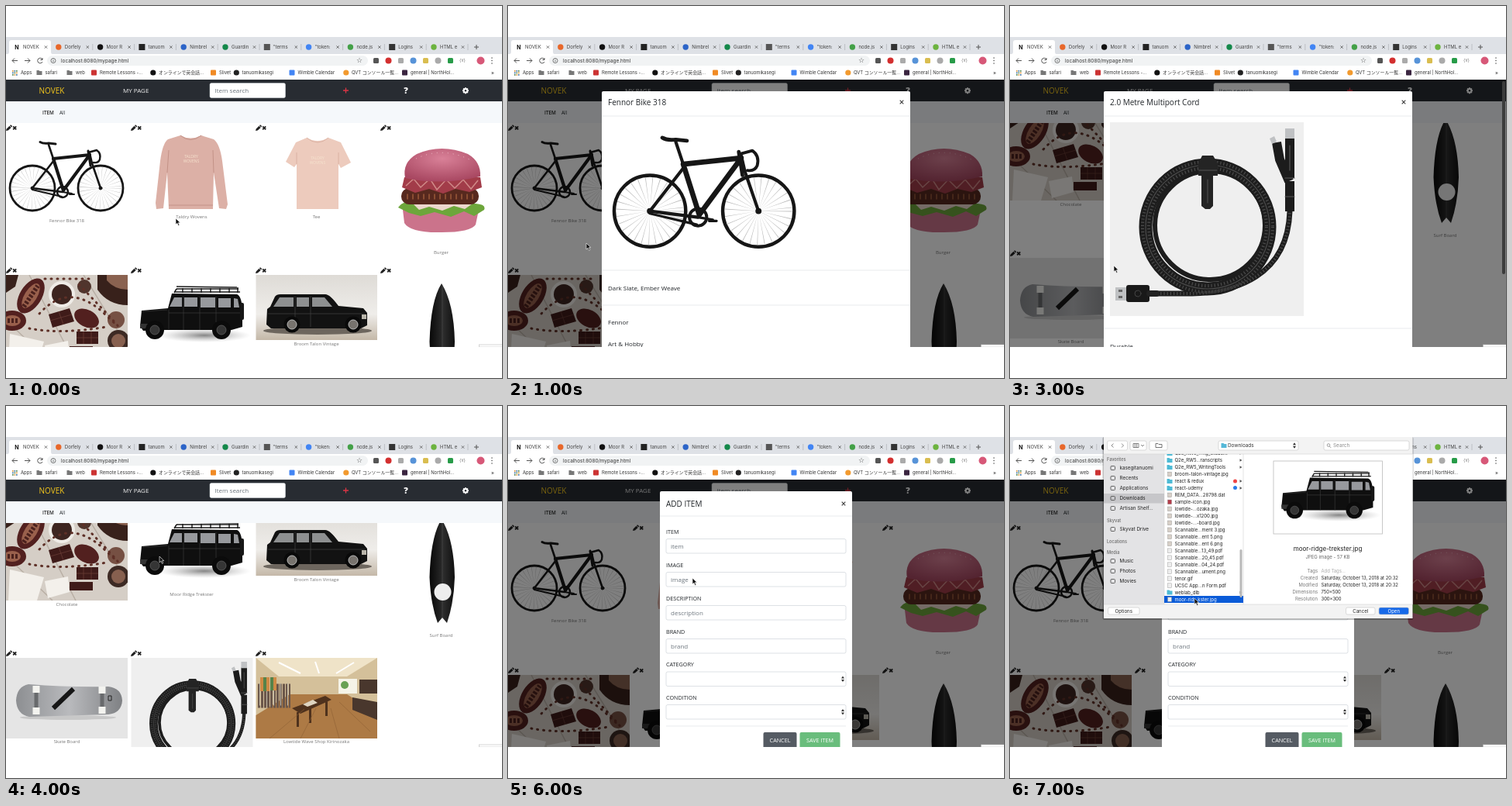
These frames come from a looping animation (640 px wide and 480 px high, 8 s). An HTML page:

```html
<!DOCTYPE html>
<html lang="en">
<head>
<meta charset="utf-8">
<title>Item page demo</title>
<style>
html, body { margin: 0; width: 100%; height: 100%; overflow: hidden; background: #fff; }
svg { display: block; width: 640px; height: 480px; }
text { font-family: "Open Sans", sans-serif; white-space: pre; }
.ui { font-family: Inter, "Noto Sans CJK JP", sans-serif; }
</style>
</head>
<body>
<svg viewBox="0 0 640 480">
<defs>
  <clipPath id="view"><path d="M0 95H640V440H0Z"/></clipPath>
  <clipPath id="items"><path d="M0 151H640V440H0Z"/></clipPath>
  <clipPath id="cocoaBox"><path d="M0 347H157V463H0Z"/></clipPath>
  <clipPath id="listBox"><path d="M199 62H301V255H199Z"/></clipPath>
  <radialGradient id="bun" cx=".5" cy=".3" r=".7"><stop stop-color="#d98198"/><stop offset="1" stop-color="#a94862"/></radialGradient>
  <linearGradient id="studio" x2="0" y2="1"><stop stop-color="#dedbd6"/><stop offset=".6" stop-color="#efedea"/><stop offset="1" stop-color="#c4b8a8"/></linearGradient>
  <linearGradient id="deck"><stop stop-color="#8d8f92"/><stop offset=".5" stop-color="#b9babd"/><stop offset="1" stop-color="#7f8184"/></linearGradient>
  <linearGradient id="board"><stop stop-color="#080808"/><stop offset=".55" stop-color="#2c2c2c"/><stop offset="1" stop-color="#101010"/></linearGradient>
  <radialGradient id="shade"><stop stop-color="#666" stop-opacity=".8"/><stop offset="1" stop-color="#aaa" stop-opacity="0"/></radialGradient>

  <g id="bike" fill="none" stroke="#161616" stroke-linecap="round" stroke-linejoin="round">
    <g id="wheel"><circle cx="34" cy="235" r="29" stroke-width="2.8"/>
      <circle cx="34" cy="235" r="15" stroke="#bbb" stroke-width="25" stroke-dasharray=".3 3.1" stroke-linecap="butt"/><circle cx="34" cy="235" r="2" fill="#161616"/></g>
    <use href="#wheel" x="88"/>
    <path stroke-width="4.2" d="M61 197 108 192 74 238Z"/>
    <path stroke-width="2.6" d="M55 179 61 197M62 199 34 235 73 240M108 190 111 203 122 235"/>
    <path stroke-width="3" d="M44 175.5Q48 178 55 177L64 178M106 187 109 206"/>
    <path stroke-width="2.4" d="M106 189 117 186Q123 190 121 198 119 203 113 202"/>
    <circle cx="73" cy="240" r="7" stroke-width="2.5"/><path stroke-width="2" d="M73 240 85 242M82 243H88M34 237 72 246"/>
  </g>

  <g id="jeep">
    <ellipse cx="256" cy="425" rx="60" ry="9" fill="url(#shade)"/>
    <path d="M214 371 298 372Q304 374 305 392V414L291 418H205L177 419 173 413 175 393 209 390Z" fill="#0f0f0f"/>
    <path d="M217 376 227 376V388H211ZM230 376H247V388H230ZM251 376H270V389H251ZM274 377H290V389H274ZM294 377 299 378 301 389H294Z" fill="#97999d"/>
    <path d="M220 365H300M218 369H302M220 365 217 370M228 364V370M240 364V370M252 364V370M264 364V370M276 364V370M288 364V370M299 363V370M220 362 298 363" stroke="#1b1b1b" stroke-width="1.5"/>
    <path d="M176 394 208 392M210 392V417M229 375V418M250 375V418M271 375V408M210 396H303" stroke="#3c3c3c" stroke-width=".7"/>
    <path d="M173 410H184V416H173Z" fill="#333"/><rect x="302" y="383" width="5" height="22" rx="2" fill="#171717"/>
    <g id="tyre"><circle cx="192" cy="418" r="12" fill="#0b0b0b"/><circle cx="192" cy="418" r="6" fill="#353535" stroke="#666" stroke-width=".7"/></g>
    <use href="#tyre" x="86"/>
  </g>

  <g id="cable" fill="none" stroke-linecap="round">
    <path fill="#efefef" d="M129 150H379V400H129Z"/>
    <g stroke="#1d1d1d"><circle cx="255" cy="285" r="80" stroke-width="17"/><ellipse cx="258" cy="283" rx="71" ry="70" stroke-width="6"/>
      <path stroke-width="7" d="M190 371 235 371C290 369 358 350 361 265"/></g>
    <g stroke="#4b4b4b" stroke-width="1.2" stroke-linecap="butt"><circle cx="255" cy="285" r="84" stroke-width="4" stroke-dasharray="1.2 3"/><circle cx="255" cy="285" r="76" stroke-width="4" stroke-dasharray="1.2 3"/>
      <circle cx="255" cy="285" r="80"/><path stroke-width="4" stroke-dasharray="1.2 3" d="M190 371 235 371C290 369 358 350 361 265"/></g>
    <path fill="#242424" d="M248 193H262L268 203V219H262V258L258 262H252L247 258V219H243V203Z"/><path stroke="#555" d="M244 212H267M255 224V254"/>
    <path stroke="#1c1c1c" stroke-width="12" stroke-linecap="butt" d="M361 170V222M344 176 348 198 360 226M361 226V265"/>
    <path stroke="#565656" stroke-width="1.2" d="M355 222H367M355 246H367M361 180V212"/>
    <path fill="#bfc1c3" d="M355 158H367V171H355ZM335 171 341 168 344 175 338 178ZM136 363H152V380H136Z"/>
    <path fill="#666" d="M140 366H145V369H140ZM140 374H145V377H140Z"/>
    <rect x="150" y="360" width="30" height="22" rx="3" fill="#191919"/><path stroke="#222" stroke-width="8" d="M180 371H189"/><circle cx="165" cy="371" r="4" stroke="#444"/>
  </g>

  <g id="cocoa" clip-path="url(#cocoaBox)">
    <path fill="#d5cec6" d="M0 347H157V463H0Z"/><path stroke="#b9afa5" stroke-width="1.5" d="M30 347 90 463M100 347 157 440M0 405 60 463"/>
    <path fill="#38211b" d="M0 347H16L12 362 0 370ZM118 347H157V386Q132 386 118 366Z"/><path fill="#8a6250" d="M130 347H157V366Q140 366 130 354Z"/>
    <g fill="#52201f"><ellipse cx="32" cy="374" rx="14" ry="25" transform="rotate(32 32 374)"/><ellipse cx="8" cy="406" rx="18" ry="13"/><ellipse cx="104" cy="403" rx="17" ry="11" transform="rotate(28 104 403)"/></g>
    <g fill="#99604c"><ellipse cx="32" cy="374" rx="8" ry="18" transform="rotate(32 32 374)"/><ellipse cx="8" cy="406" rx="11" ry="7"/></g>
    <path d="M23 388 41 361M2 406H15" stroke="#4b211d" stroke-width="6" stroke-dasharray="3 2"/>
    <circle cx="72" cy="372" r="17" fill="#efece7"/><circle cx="72" cy="372" r="13" fill="#3d2520"/><circle cx="101" cy="362" r="9" fill="#50352d"/>
    <path fill="#3f1b19" d="M55 398 82 390 88 407 60 415ZM91 420H119V436H91ZM82 439H112V450H82Z"/><path stroke="#6e4038" stroke-width=".7" d="M57 406 85 398M68 394 74 411M91 428H119M100 420V436M110 420V436"/>
    <path fill="#f3f0eb" d="M5 423 49 433 40 463H3ZM50 438 80 432 82 452 54 460Z"/>
    <circle cx="142" cy="405" r="11" fill="#765043"/><circle cx="145" cy="432" r="14" fill="#3d2a24"/><circle cx="145" cy="432" r="9" fill="#87604f"/>
    <path d="M43 397Q82 354 128 398T90 355M50 352H110M30 416Q70 424 130 414" fill="none" stroke="#5e3027" stroke-width="3" stroke-linecap="round" stroke-dasharray="1 7"/>
  </g>

  <g id="cruiser">
    <path fill="url(#studio)" d="M322.5 347H479V431H322.5Z"/><ellipse cx="402" cy="419" rx="70" ry="5" fill="#6d665e"/>
    <path fill="#121212" d="M347 375Q349 372 354 372H412Q418 372 429 387L461 390 466 396V412L458 416H342L336 411 337 391 341 388Z"/>
    <path fill="#8e9091" d="M353 376H371V388H345ZM375 376H391V388H375ZM395 376H411L421 388H395Z"/>
    <path d="M338 397H463M373 375V414M393 375V414" stroke="#444" stroke-width=".7"/><path fill="#b9b5aa" d="M459 398H465V404H459Z"/>
    <g id="rim"><circle cx="369" cy="411" r="10.5" fill="#090909"/><circle cx="369" cy="411" r="6" fill="#77736e" stroke="#bbb"/></g><use href="#rim" x="79"/>
  </g>

  <g id="burger">
    <path fill="#cb738b" d="M512 263H610L606 282Q600 292 562 292 522 293 514 280Z"/>
    <path fill="#6da63b" d="M506 260Q514 249 526 255H606Q620 256 617 263L604 271 591 265 574 272 553 266 535 271 520 267Z"/>
    <path fill="#ecd7cd" d="M525 255H602L592 262 578 258 563 264 546 259 533 263Z"/>
    <rect x="510" y="235" width="100" height="21" rx="10" fill="#57291e"/><path d="M517 246H604" stroke="#8a4d32" stroke-width="7" stroke-dasharray="2 5"/>
    <path fill="#a23c49" d="M514 221H612L614 234 598 240 580 236 564 242 546 236 528 241 511 234Z"/>
    <path d="M516 232 526 223 535 234 547 223 556 237 568 224 579 235 590 224 600 236 609 225" fill="none" stroke="#d08a88" stroke-width="1.5"/>
    <path fill="url(#bun)" d="M515 222Q511 202 530 191 562 177 596 191 613 201 612 220 562 232 515 222Z"/>
    <path d="M529 197Q562 181 598 198" fill="none" stroke="#f1bdc8" stroke-dasharray="1 6"/>
  </g>

  <g id="surf"><path fill="url(#board)" d="M562 358Q548 380 546.5 433 548 468 557 492L563 485 569 492Q578 466 579 433 578 384 562 358Z"/><path stroke="#555" stroke-width=".6" d="M563 360V485"/><circle cx="563.5" cy="452" r="11" fill="#eee"/></g>

  <g id="skate">
    <path fill="#e5e5e5" d="M0 325H157V429H0Z"/><ellipse cx="80" cy="402" rx="62" ry="3" fill="#c8c8c8"/>
    <path fill="url(#deck)" d="M29 359Q82 363 132 362 149 364 150 380 149 396 132 398L30 401Q14 398 13 380 14 362 29 359Z"/>
    <path stroke="#161616" stroke-width="6" d="M61 390 87 365"/>
    <path stroke="#686a6c" stroke-width="5" d="M39 366V394M124 366V394"/><path stroke="#f3f3ef" stroke-width="9" d="M39 361V370M39 389V398M124 362V371M124 388V397"/>
    <path stroke="#222" d="M132 374H136V380H132Z" fill="none"/>
  </g>

  <g id="shop">
    <path fill="#d4c09a" d="M322.5 325H479V429H322.5Z"/><path fill="#efe3c8" d="M322.5 325H479L440 349H352Z"/><path fill="#ad7a45" d="M322.5 399 366 372H440L479 397V429H322.5Z"/>
    <path stroke="#fff" stroke-width="2" d="M352 331 380 345M399 330 404 345M449 331 426 345"/>
    <path d="M325 374H367" stroke="#6b574b" stroke-width="31" stroke-dasharray="3 1"/><path d="M327 372H365" stroke="#c0b9a8" stroke-width="29" stroke-dasharray="1 8"/>
    <path d="M330 350V368M338 350V368M347 350V367" stroke="#cf8a45" stroke-width="4"/><path d="M334 350V368M343 350V367" stroke="#56834a" stroke-width="4"/>
    <path fill="#f5f3e7" d="M429 352H453V371H429Z"/><circle cx="437" cy="360" r="5" fill="#68a052"/><path fill="#49372d" d="M456 353H479V371H456ZM447 376 479 382V405L447 392Z"/>
    <path fill="#4f321d" d="M369 390 412 374 420 379 380 397ZM391 381H394V409H391ZM412 379H415V400H412ZM375 395H378V414H375Z"/><path fill="#ded4c0" d="M383 385 396 379 402 383 389 388Z"/>
    <path stroke="#8e6035" stroke-width=".6" d="M340 429 385 391M380 429 400 390M430 429 419 390M470 420 430 382"/>
  </g>
</defs>
<g id="stage"></g>
</svg>

<script>
const stage = document.getElementById('stage');

// Text is placed by its vertical centre.
const text = (x, y, s, size, fill = '#212529', more = '') =>
  `<text x="${x}" y="${y + size * .36}" font-size="${size}" fill="${fill}" ${more}>${s}</text>`;
const ui = (x, y, s, size = 5.9, fill = '#333', more = '') => text(x, y, s, size, fill, 'class="ui" ' + more);
const mid = 'text-anchor="middle"', end = 'text-anchor="end"';
const rect = (x, y, w, h, fill, more = '') => `<rect x="${x}" y="${y}" width="${w}" height="${h}" fill="${fill}" ${more}/>`;
const dot = (x, y, r, fill) => `<circle cx="${x}" cy="${y}" r="${r}" fill="${fill}"/>`;
const line = (d, stroke = '#555', w = 1) => `<path d="${d}" fill="none" stroke="${stroke}" stroke-width="${w}"/>`;
const cross = (x, y, r, stroke, w) => line(`M${x - r} ${y - r}l${2 * r} ${2 * r}m0 ${-2 * r}l${-2 * r} ${2 * r}`, stroke, w);
const folder = (x, y, fill) => `<path d="M${x - 3.5} ${y - 3}h3l1 1h3v5h-7z" fill="${fill}"/>`;

function browser() {
  const tabs = [['NOVEK', ''], ['Dorfely', '#e8672a'], ['Moor R', '#111'], ['tanuom', '#222'], ['Nimbrel', '#2c64c8'], ['Guardin', '#14884a'],
    ['"terms', '#555'], ['"token:', '#4285f4'], ['node.js', '#43a047'], ['Logins', '#333'], ['HTML e', '#6cb33f']];
  const marks = [[19, 'Apps'], [50.5, 'safari'], [90, 'web'], [121, 'Remote Lessons -…', '#c33'], [197, 'オンラインで英会話…', '#111'], [275, 'Slivet', '#f08a24'],
    [304.5, 'tanuomikasegi', '#222'], [376.5, 'Wimble Calendar', '#4285f4'], [446, 'QVT コンソール一覧…', '#f29a2e'], [522, 'general | NorthHol…', '#3a2540']];
  const extras = ['#555', '#d32f2f', '#aaa', '#5793d8', '#d9bd50', '#aaa', '#279b48'];
  return rect(0, 40, 640, 22, '#dee1e6') + `<path d="M2 62Q4 62 4 59V47Q4 44 7 44H55Q58 44 58 47V59Q58 62 60 62Z" fill="#fff"/>` +
    tabs.map(([s, c], i) => {
      const x = 14 + i * 53.8;
      return (c ? (i % 3 ? dot(x, 53, 3.7, c) : rect(x - 4, 49, 8, 8, c)) : ui(x, 53, 'N', 7, '#111', mid + ' font-weight="700"')) +
        ui(x + 8, 53, s, 6, '#444') + cross(x + 37.5, 53, 1.7, '#555', .8) + (i ? line(`M${x + 44} 49v8`, '#9b9ea3', .5) : '');
    }).join('') + line('M604 53h6m-3-3v6') +
    rect(0, 62, 640, 33, '#fff') + rect(53, 64, 414, 13, '#f1f3f4', 'rx="6.5"') +
    line('M15 70.5H8m3-3-3 3 3 3M24 70.5h7m-3-3 3 3-3 3M47 69a3.3 3.3 0 1 0 0 3m0-5v2.5h-2.5') +
    `<circle cx="61" cy="70.5" r="3" fill="none" stroke="#555" stroke-width=".8"/>` + line('M61 70v2m0-3.3v.7', '#555', .8) +
    ui(71, 70.5, 'localhost:8080/mypage.html', 6.45) + text(456, 70, '☆', 9, '#555', mid) +
    extras.map((c, i) => i % 2 ? dot(477.5 + i * 16, 70.5, 4, c) : rect(474 + i * 16, 67, 7, 7, c, 'rx="1.5"')).join('') +
    ui(589, 70.5, '{v}', 5.5, '#777', mid) + dot(612.5, 70.5, 5, '#d75878') +
    [67, 70.5, 74].map(y => dot(627, y, .8, '#555')).join('') +
    [0, 1, 2].map(i => [0, 1, 2].map(j => rect(8 + i * 2.5, 83 + j * 2.5, 1.7, 1.7, ['#d94', '#47a', '#585'][(i + j) % 3])).join('')).join('') +
    folder(43, 86, '#777') + folder(82, 86, '#777') +
    marks.map(([x, s, c], i) => ui(x, 86, s) + (c ? (i % 2 ? rect(x - 11, 82.5, 7, 7, c, 'rx="1"') : dot(x - 7.2, 86, 3.6, c)) : '')).join('') +
    ui(626, 86, '»', 6.5);
}

function header() {
  const teeth = [0, 45, 90, 135].map(a => `<path d="M593 105.2v8" stroke="#fff" stroke-width="2" transform="rotate(${a} 593 109.2)"/>`).join('');
  return rect(0, 95, 640, 28, '#282c32') + rect(0, 123, 640, 28, '#f5f8fb') +
    text(42.5, 109, 'NOVEK', 10, '#f5c81c') + text(151, 109, 'MY PAGE', 8, '#f0f0f0') +
    rect(263, 99.5, 97.5, 19, '#fff', 'rx="2" stroke="#ced4da" stroke-width=".5"') + text(269.5, 109, 'Item search', 8, '#6c757d') +
    line('M435 109h7m-3.5-3.5v7', '#dc3545', 1.3) + text(516, 109, '?', 11, '#fff', mid + ' font-weight="800"') +
    teeth + dot(593, 109.2, 3.1, '#fff') + dot(593, 109.2, 1.2, '#282c32') +
    text(47, 137.5, 'ITEM', 6.3, '#222', 'font-weight="600"') + text(69, 137.5, 'All', 6.3);
}

function items(scroll) {
  const caption = (col, y, s) => text(78.5 + col * 161, y, s, 6, '#777', mid);
  const tools = (col, y) => `<g transform="translate(${col * 161} ${y})"><path d="M0 4 .7 1.5 4.5-2.3 6.7-.1 2.8 3.5ZM5-2.8 6-3.7Q8-3 8-1.5L7.2-.6Z" fill="#222"/>${cross(11.2, .3, 2, '#222', 1.9)}</g>`;
  const print = (x, y) => ['TALDRY', 'WOVENS'].map((s, i) => text(x, y + i * 6, s, 5, '#f6e3cf', mid)).join('');
  const tops = `<path fill="#dcb0a6" d="M225 167Q238 174 252 167L268 172Q276 178 279 200L286 256 284 262 275 261 268 215 267 262H210L208 215 203 261 194 262 193 254 199 200Q202 177 209 172Z"/>` +
    line('M225 167Q238 178 252 167M210 257H267M208 215 210 186M268 215 267 186', '#c39287') + print(239, 194) +
    `<path fill="#edcbbd" d="M388 170Q402 178 416 170L432 176 445 202 432 209 429 204V262H375V204L372 208 361 201 374 176Z"/>` +
    line('M388 170Q402 182 416 170M375 204V189M429 204V189', '#d6ab9c', .8) + print(402, 196);
  const lower = ['skate', 'shop'].map(id => `<use href="#${id}"/>`).join('') +
    `<use href="#cable" transform="translate(161.5 325) scale(.628) translate(-129 -150)"/>` +
    [0, 1, 2].map(i => tools(i, 319)).join('') + caption(0, 433, 'Skate Board') + caption(2, 433, 'Lowtide Wave Shop Kirinozaka');
  return `<g clip-path="url(#items)"><g transform="translate(0 ${-scroll})">` + tops +
    ['bike', 'burger', 'cocoa', 'jeep', 'cruiser', 'surf'].map(id => `<use href="#${id}"/>`).join('') +
    [157, 341].map(y => [0, 1, 2, 3].map(i => tools(i, y)).join('')).join('') +
    caption(0, 277, 'Fennor Bike 318') + caption(1, 271.5, 'Taldry Wovens') + caption(2, 271.5, 'Tee') + caption(3, 317.5, 'Burger') +
    caption(0, 468, 'Chocolate') + caption(1, 454.5, 'Moor Ridge Trekster') + caption(2, 435.5, 'Broom Talon Vintage') + caption(3, 507.5, 'Surf Board') +
    `<g transform="translate(0 212)">${lower}</g></g></g>`;
}

const dim = rect(0, 95, 640, 345, '#000', 'opacity=".5"');
const rule = (y, x0 = 121, x1 = 519) => line(`M${x0} ${y}H${x1}`, '#dee2e6', .7);

function detail({ title, art, x, y, scale = 1.592, h, notes }, dy = 0, alpha = 1) {
  const b = 150 + h, rows = [39, 83, 111, 139];
  return `<g clip-path="url(#view)"><g opacity="${alpha}" transform="translate(0 ${dy})">` + rect(121, 110, 398, b + 43, '#fff', 'rx="2"') +
    text(129, 124, title, 10) + cross(508, 124, 2.3, '#444', 1.2) + rule(142) +
    `<use href="#${art}" transform="translate(129 150) scale(${scale}) translate(${-x} ${-y})"/>` + rule(b + 16) + rule(b + 61) +
    notes.map((s, i) => text(129, b + rows[i], s, 8)).join('') + '</g></g>';
}
const bike = { title: 'Fennor Bike 318', art: 'bike', x: 0, y: 163, h: 175, notes: ['Dark Slate, Ember Weave', 'Fennor', 'Art &amp; Hobby', 'Good'] };
const jeep = { title: 'Moor Ridge Trekster', art: 'jeep', x: 161.5, y: 347, h: 166, notes: ['Cool', 'Moor Talon', 'Art &amp; Hobby', 'New'] };
const cord = { title: '2.0 Metre Multiport Cord', art: 'cable', x: 129, y: 150, scale: 1, h: 250, notes: ['Durable'] };

const arrows = (x, y) => `<path d="M${x - 2} ${y - .8}l2-3 2 3zm0 1.6l2 3 2-3z" fill="#333"/>`;

function form() {
  const field = (y, label, hint) => text(204, y, label, 7.2) + rect(204, y + 9.5, 232, 18.5, '#fff', 'rx="2" stroke="#ced4da" stroke-width=".7"') +
    (hint ? text(210, y + 18.8, hint, 8, '#6c757d') : arrows(432, y + 18.8));
  const button = (x, w, s, fill) => rect(x, 421, w, 22, fill, 'rx="2"') + text(x + w / 2, 431, s, 7.2, '#fff', mid);
  return '<g clip-path="url(#view)">' + rect(196, 110, 248, 350, '#fff', 'rx="2"') + rule(142, 196, 444) + text(204, 126, 'ADD ITEM', 10) + cross(433, 126, 2.3, '#444', 1.2) +
    field(162, 'ITEM', 'item') + field(205, 'IMAGE', 'image') + field(248, 'DESCRIPTION', 'description') +
    field(291, 'BRAND', 'brand') + field(333.5, 'CATEGORY') + field(376, 'CONDITION') + rule(413, 204, 436) +
    button(329.5, 43, 'CANCEL', '#555b63') + button(376.5, 52, 'SAVE ITEM', '#69bd7c') + '</g>';
}

function picker() {
  const side = [[69, 'Favorites', 1], [80, 'kasegitanuomi'], [93, 'Recents'], [106, 'Applications'], [119, 'Downloads'], [132, 'Artisan Shelf…'], [148, 'Skyvat', 1],
    [159, 'Skyvat Drive'], [175, 'Locations', 1], [189, 'Media', 1], [200, 'Music'], [213, 'Photos'], [226, 'Movies']];
  const files = ['Q2e_RW5_…ng_Student', 'Q2e_RW5…ranscripts', 'Q2e_RW5_WritingTools', 'broom-talon-vintage.jpg', 'react &amp; redux', 'react-udemy', 'REM_DATA…28798.dat',
    'sample-icon.jpg', 'lowtide-…ozaka.jpg', 'lowtide-…x1200.jpg', 'lowtide-…-board.jpg', 'Scannable…ment 3.jpg', 'Scannable…ent 5.png', 'Scannable…ent 6.png',
    'Scannable…13_49.pdf', 'Scannable…20_45.pdf', 'Scannable…04_24.pdf', 'Scannable…ument.png', 'tenor.gif', 'UCSC App…n Form.pdf', 'weblab_dlb', 'moor-rid…kster.jpg'];
  const folders = [0, 1, 2, 4, 5, 20];
  const facts = [['Tags', 'Add Tags…'], ['Created', 'Saturday, October 13, 2018 at 20:32'], ['Modified', 'Saturday, October 13, 2018 at 20:32'], ['Dimensions', '750×500'], ['Resolution', '300×300']];
  const button = (x, y, w, h, s = '', fill = '#fff', ink = '#222') => rect(x, y, w, h, fill, 'rx="2" stroke="#c4c4c4" stroke-width=".6"') + ui(x + w / 2, y + h / 2, s, 6.1, ink, mid);
  return rect(119.5, 40, 401, 236, '#000', 'opacity=".25" rx="2"') + rect(121, 40, 398.5, 234, '#f3f3f3') + rect(121, 62, 78, 194, '#e3e3e5') + rect(199, 62, 320.5, 194, '#fff') +
    line('M121 62H519.5M121 256H519.5M301 62V256M199 62V256', '#d0d0d0', .6) +
    button(125.5, 45, 26, 12) + line('M133.5 48.5l-2.5 2.5 2.5 2.5M144 48.5l2.5 2.5-2.5 2.5', '#888') +
    button(155, 45, 21, 12) + line('M159 48.5h7v5h-7zm2.3 0v5m2.3-5v5M169 50l2 2 2-2', '#555', .7) +
    button(180, 45, 23, 12) + line('M188 48.5h3l1 1h4v4h-8z', '#555', .8) +
    button(269, 45, 103, 12) + folder(276, 51, '#56b8d8') + ui(281, 51, 'Downloads', 6.4) + arrows(367, 51) +
    button(405, 45, 110, 12) + `<circle cx="411" cy="50.5" r="1.8" fill="none" stroke="#777" stroke-width=".7"/>` + line('M412.3 52l2 2', '#777', .7) + ui(417, 51, 'Search', 6.4, '#888') +
    rect(121, 113, 78, 12.5, '#c6c6c9') +
    side.map(([y, s, head]) => head ? ui(125, y, s, 5.5, '#777', 'font-weight="600"') : rect(130, y - 2.5, 5.5, 5, 'none', 'rx="1" stroke="#555" stroke-width=".9"') + ui(141.5, y, s, 6.3, '#222')).join('') +
    '<g clip-path="url(#listBox)">' + rect(199, 245, 102, 9, '#0a5bd8') +
    files.map((s, i) => {
      const y = 61 + i * 8.98, dir = folders.includes(i);
      return (dir ? folder(206, y, '#4dbad5') : rect(203.5, y - 2.8, 5, 5.6, i === 7 ? '#b43a48' : i > 13 ? '#eee' : '#d8d0c8', 'stroke="#888" stroke-width=".4"')) +
        ui(212.5, y, s, 6, i === 21 ? '#fff' : '#222') + (dir ? `<path d="M296.5 ${y - 1.8}l3 1.8-3 1.8z" fill="#555"/>` : '');
    }).join('') + dot(290.5, 97, 2.5, '#ef4444') + dot(290.5, 105.5, 2.5, '#287be8') + rect(296.5, 185, 3, 62, '#b9b9b9', 'rx="1.5"') + '</g>' +
    rect(340, 71, 140.5, 94, '#fff', 'stroke="#bbb" stroke-width=".8"') + `<use href="#jeep" transform="translate(340 71) scale(.895) translate(-161.5 -347)"/>` +
    ui(410, 184, 'moor-ridge-trekster.jpg', 8, '#222', mid) + ui(410, 194.5, 'JPEG image - 57 KB', 6, '#666', mid) +
    facts.map(([k, v], i) => ui(397, 213 + i * 9, k, 5.9, '#777', end) + ui(401.5, 213 + i * 9, v, 5.9, i ? '#222' : '#aaa')).join('') +
    button(126.5, 260, 40.5, 9, 'Options') + button(433.5, 260, 37.5, 9, 'Cancel') + button(476, 260, 38.5, 9, 'Open', '#1769e8', '#fff');
}

const scrollbar = rect(635, 97, 4, 249, '#3c3c3c', 'rx="2"');

// One entry per second: cursor position, page scroll, then what lies over the page.
const scenes = [
  [219, 274, 0, ''],
  [101, 306, 0, dim + detail(bike)],
  [100, 310, 0, dim + detail(bike, -78, .59)],
  [134, 335, 212, dim + detail(cord) + scrollbar],
  [198, 194, 212, ''],
  [42, 301, 0, dim + detail(jeep, -29, .59)],
  [238, 222, 0, dim + form()],
  [238, 248, 0, dim + form() + picker()],
];

let shown = -1;
function frame(now) {
  const index = Math.floor(now / 1000) % scenes.length;
  if (index !== shown) {
    shown = index;
    const [x, y, scroll, layer] = scenes[index];
    stage.innerHTML = browser() + items(scroll) + header() + layer +
      rect(610.5, 437, 30, 3, '#fff', 'stroke="#bbb" stroke-width=".6"') + rect(0, 440, 640, 40, '#fff') +
      `<path d="M${x} ${y}v8l1.9-1.8 1.5 3.2 1.4-.6-1.5-3.1h2.6z" fill="#111" stroke="#fff" stroke-width=".6"/>`;
  }
  requestAnimationFrame(frame);
}
frame(performance.now());
</script>
</body>
</html>
```
